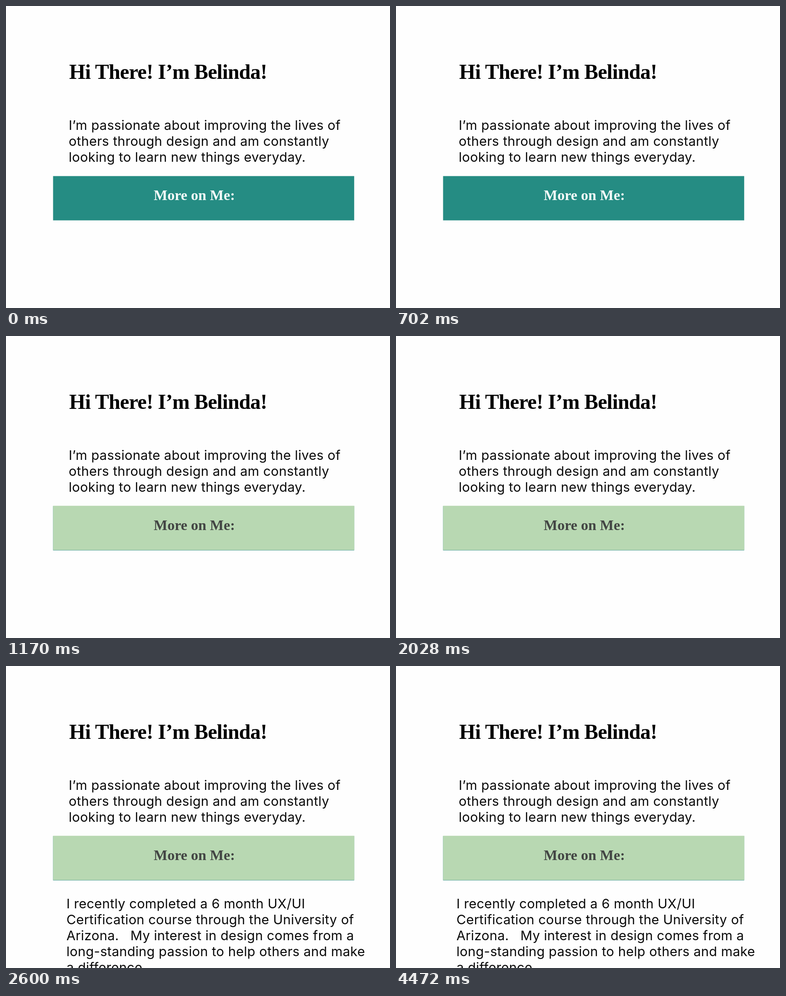
Recreate the animation shown at these times as an HTML page. Size 845 by 663 pixels, loop 5720 ms.

```html
<!DOCTYPE html>
<html lang="en">
<head>
<meta charset="utf-8">
<title>About me</title>
<style>
  html, body { margin: 0; width: 100%; height: 100%; overflow: hidden; background: #fefefe; }
  svg { display: block; width: 845px; height: 663px; }
  text { white-space: pre; }
  .serif { font-family: "Liberation Serif", "Times New Roman", serif; font-weight: 700; }
  .title { font-size: 46px; letter-spacing: -0.75px; }
  .label { font-size: 32px; }
  .body { font: 400 29px Inter, "Open Sans", sans-serif; letter-spacing: 0.3px; fill: #0a0a0a; }
</style>
</head>
<body>
<svg viewBox="0 0 845 663">
  <rect width="845" height="663" fill="#fefefe"/>
  <text class="serif title" x="139" y="160">Hi There! I’m Belinda!</text>
  <g id="intro" class="body"></g>
  <rect id="edge" x="103.6" y="373.4" width="662.6" height="97.2" fill="#258c83"/>
  <rect id="hover" x="103.6" y="372.7" width="662.8" height="97.2" fill="#b8d8b2"/>
  <text id="label" class="serif label" x="325" y="426">More on Me:</text>
  <g id="more" class="body"></g>
</svg>
<script>
const LOOP = 5720, HOVER_AT = 1170, OPEN_AT = 2600, LEADING = 35;
const $ = id => document.getElementById(id);

function addLines(group, x, y, lines) {
  lines.forEach((line, i) => {
    const t = document.createElementNS("http://www.w3.org/2000/svg", "text");
    t.setAttribute("x", x);
    t.setAttribute("y", y + i * LEADING);
    t.textContent = line;
    group.append(t);
  });
}

addLines($("intro"), 138, 271.5, [
  "I’m passionate about improving the lives of",
  "others through design and am constantly",
  "looking to learn new things everyday."
]);
addLines($("more"), 133, 531.5, [
  "I recently completed a 6 month UX/UI",
  "Certification course through the University of",
  "Arizona.   My interest in design comes from a",
  "long-standing passion to help others and make",
  "a difference."
]);

const show = (id, on) => $(id).setAttribute("visibility", on ? "visible" : "hidden");

function draw(t) {
  const hovered = t >= HOVER_AT;
  show("hover", hovered);
  show("more", t >= OPEN_AT);
  $("label").setAttribute("fill", hovered ? "#424543" : "#f4faf9");
}

const start = performance.now();
function tick() {
  draw((performance.now() - start) % LOOP);
  requestAnimationFrame(tick);
}
tick();
</script>
</body>
</html>
```
